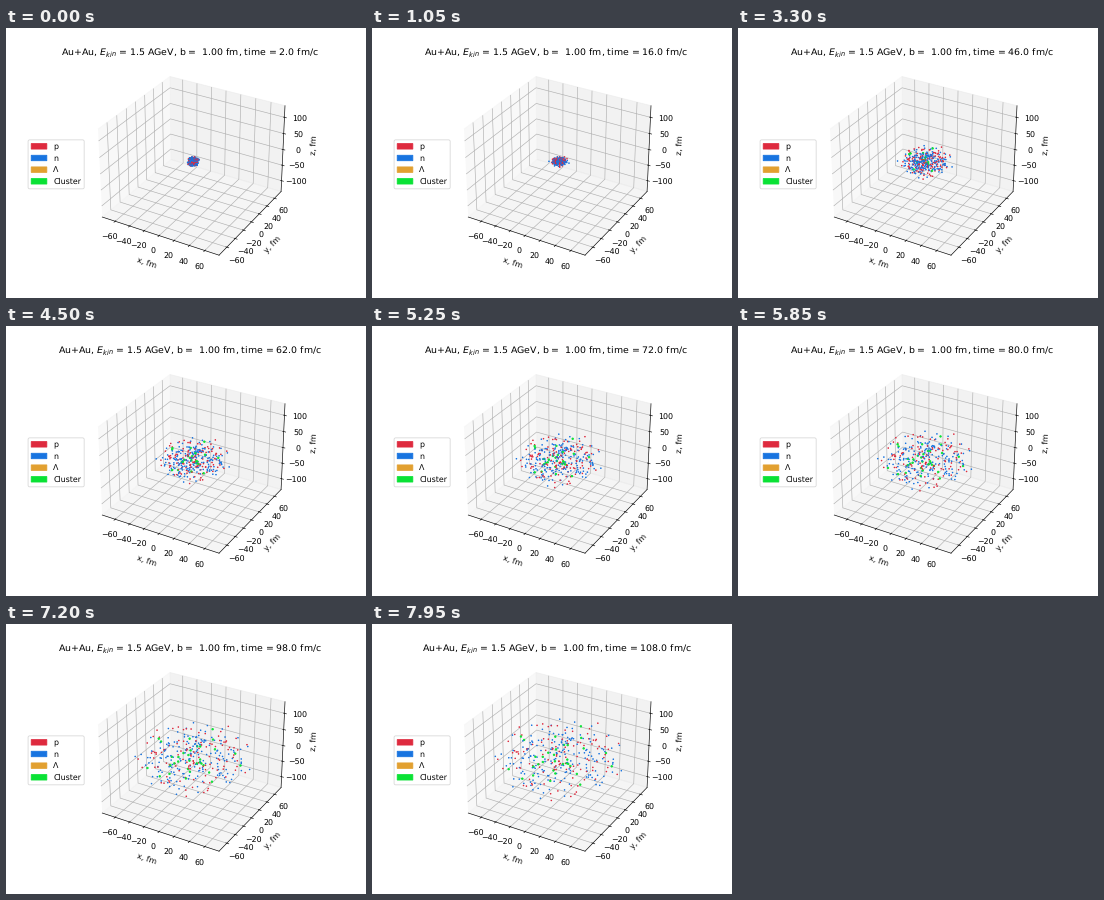
A matplotlib script for the animation above (8 s loop, 360x270 px).

```python
import numpy as np
import matplotlib.pyplot as plt
from matplotlib.animation import FuncAnimation
from matplotlib.patches import Patch

plt.rcParams.update({"text.hinting": "none", "path.snap": False})

RED, BLUE, ORANGE, GREEN = "#de2a3e", "#1874e0", "#e2a030", "#0ae235"
TICK_MS, TICKS_PER_STEP, TICKS = 50, 3, 160
NUCLEONS, PROTONS = 394, 158
CLUSTERS, CLUSTER_SIZE = 32, 3
RADIUS, GAMMA, BEAM_SPEED, MAX_SPEED = 6.6, 1.34, 0.67, 0.77
MARGIN = 25 / 24

rng = np.random.default_rng(7)


def ball_points(count, power=1 / 3):
    v = rng.normal(size=(count, 3))
    v /= np.linalg.norm(v, axis=1, keepdims=True)
    return v * rng.random((count, 1)) ** power


# Two contracted nuclei approach along z with an impact parameter of 1 fm.
side = np.where(np.arange(NUCLEONS) % 2, 1, -1)
start = RADIUS * ball_points(NUCLEONS)
start[:, 2] = start[:, 2] / GAMMA + side * 6.5
start[:, 0] += side * 0.5
beam = np.zeros((NUCLEONS, 3))
beam[:, 2] = -side * BEAM_SPEED
hit_time = np.abs(start[:, 2]) / BEAM_SPEED

velocity = MAX_SPEED * ball_points(NUCLEONS, 0.42)
members = CLUSTERS * CLUSTER_SIZE
lead = np.arange(members) // CLUSTER_SIZE * CLUSTER_SIZE
velocity[:members] = 0.85 * velocity[lead] + rng.normal(scale=0.03, size=(members, 3))

colors = np.where(rng.permutation(NUCLEONS) < PROTONS, RED, BLUE)
form_time = np.full(NUCLEONS, np.inf)
form_time[:members] = np.repeat(rng.uniform(18, 80, CLUSTERS), CLUSTER_SIZE)
is_lead = np.arange(NUCLEONS) % CLUSTER_SIZE == 0


def positions(time):
    inbound = np.minimum(time, hit_time)[:, None]
    outbound = np.maximum(time - hit_time, 0)[:, None]
    return start + beam * inbound + velocity * outbound


fig = plt.figure(figsize=(6.4, 4.8), dpi=56.25)
ax = fig.add_subplot(projection="3d")
ax.set(xlabel="x, fm", ylabel="y, fm", zlabel="z, fm")
ax.set_xlim(-75 * MARGIN, 75 * MARGIN)
ax.set_ylim(-75 * MARGIN, 75 * MARGIN)
ax.set_zlim(-130 * MARGIN, 130 * MARGIN)
ax.set_xticks(range(-60, 61, 20))
ax.set_yticks(range(-60, 61, 20))
ax.set_zticks(range(-100, 101, 50))
ax.set_autoscale_on(False)
species = {"p": RED, "n": BLUE, "Λ": ORANGE, "Cluster": GREEN}
ax.legend(handles=[Patch(color=c, label=name) for name, c in species.items()],
          loc="center left", bbox_to_anchor=(-0.3, 0.5))
dots = []


def update(tick):
    time = 2.0 * (tick // TICKS_PER_STEP + 1)
    while dots:
        dots.pop().remove()
    bound = time >= form_time
    shown = ~bound | is_lead
    x, y, z = positions(time)[shown].T
    dots.append(ax.scatter(x, y, z, s=np.where(bound, 4, 1)[shown],
                           c=np.where(bound, GREEN, colors)[shown],
                           depthshade=False))
    ax.set_title(r"Au+Au, $E_{kin}$ = 1.5 AGeV, b =  1.00 fm, "
                 f"time = {time:.1f} fm/c")
    return dots


anim = FuncAnimation(fig, update, frames=TICKS, interval=TICK_MS,
                     repeat=True, repeat_delay=0)
plt.show()
```
